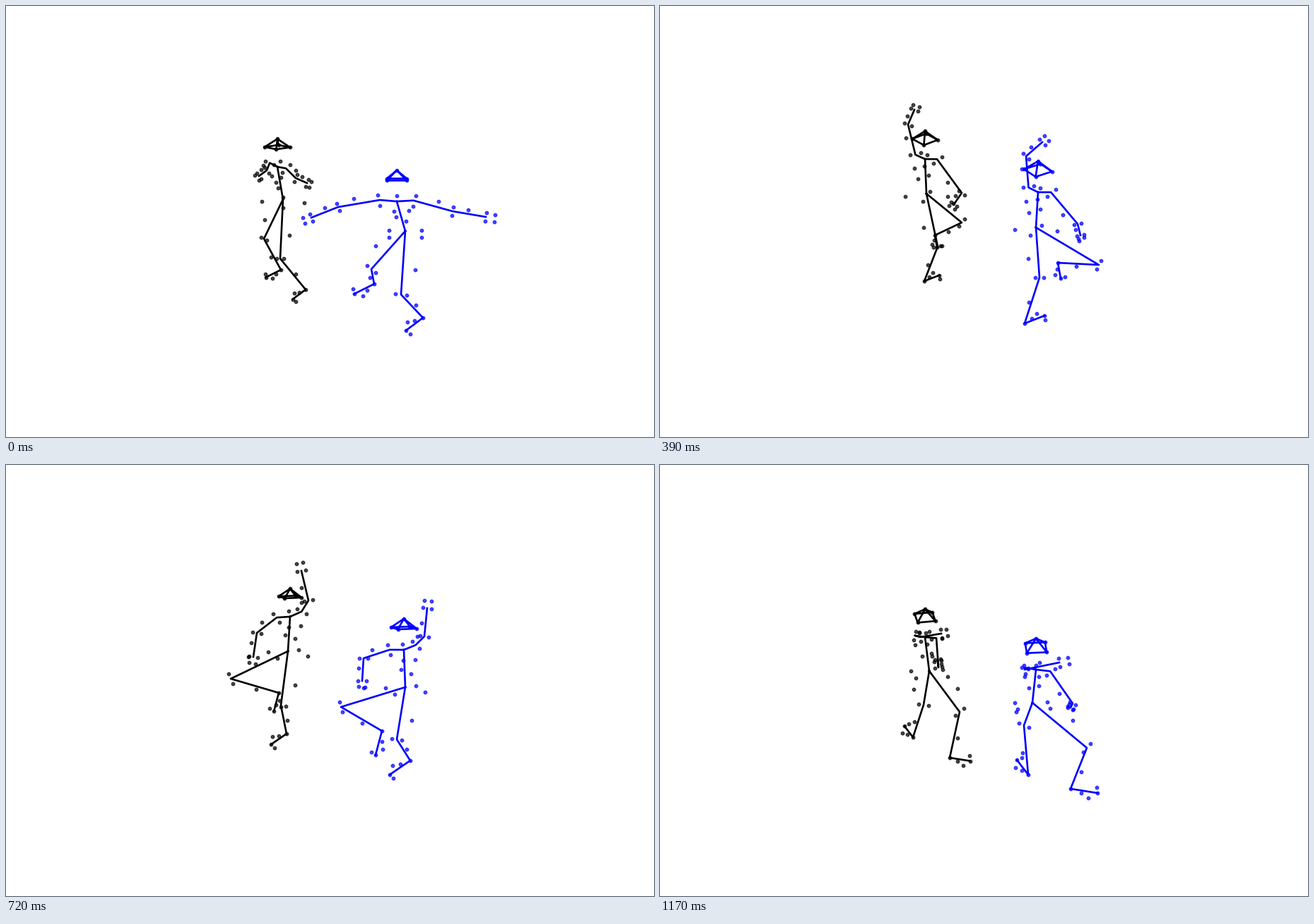
These frames come from a looping animation (917 px wide and 611 px high, 1200 ms). A matplotlib script:

```python
import numpy as np
import matplotlib.pyplot as plt
from matplotlib.animation import FuncAnimation

W, H, DPI = 917, 611, 100
FRAMES, STEP = 40, 30
KEYS = np.array([0, 9, 13, 20, 24, 30, 39])

# Per key pose: wrist A, elbow A, neck, elbow B, wrist B,
# pelvis, knee B, ankle B, knee A, ankle A.
BLACK = [
    [426, 251, 410, 244, 384, 228, 369, 233, 358, 241,
     392, 274, 365, 330, 389, 374, 388, 358, 424, 402],
    [328, 160, 319, 194, 384, 228, 451, 236, 440, 256,
     379, 281, 421, 291, 406, 329, 379, 350, 392, 403],
    [360, 147, 351, 168, 375, 217, 427, 265, 416, 281,
     377, 266, 427, 307, 389, 325, 393, 341, 374, 390],
    [390, 149, 422, 179, 393, 216, 349, 258, 356, 286,
     400, 260, 367, 320, 398, 319, 398, 344, 382, 382],
    [418, 150, 428, 192, 402, 215, 355, 238, 350, 272,
     399, 264, 318, 303, 386, 323, 389, 341, 397, 381],
    [370, 259, 395, 233, 388, 223, 399, 237, 419, 241,
     388, 277, 366, 277, 376, 325, 372, 345, 398, 387],
    [398, 239, 368, 244, 375, 244, 394, 287, 393, 278,
     381, 292, 424, 350, 410, 415, 373, 340, 358, 386],
]
BLUE = [
    [679, 299, 632, 291, 553, 277, 470, 285, 432, 300,
     565, 319, 517, 373, 521, 394, 559, 409, 590, 442],
    [503, 203, 486, 243, 543, 272, 614, 275, 602, 293,
     544, 324, 597, 328, 554, 369, 542, 392, 570, 459],
    [541, 193, 518, 213, 535, 264, 591, 309, 595, 325,
     532, 314, 621, 367, 563, 364, 537, 385, 516, 450],
    [569, 189, 592, 226, 556, 258, 495, 299, 512, 328,
     561, 306, 499, 381, 555, 375, 560, 384, 542, 410],
    [596, 203, 592, 243, 563, 262, 506, 274, 504, 306,
     565, 315, 474, 343, 532, 377, 553, 389, 572, 419],
    [529, 298, 551, 274, 551, 272, 571, 315, 598, 334,
     549, 323, 524, 321, 547, 373, 526, 390, 561, 447],
    [565, 280, 516, 290, 532, 290, 584, 338, 581, 344,
     527, 337, 604, 401, 581, 459, 515, 369, 521, 439],
]
BLACK_TURN = [-50, 155, 220, 345, 380, 455, 550]
BLUE_TURN = [0, 155, 215, 345, 380, 455, 545]
# Feet of both dancers, ankle to toe: leg B, leg A.
FEET = [[-28, 14, -24, 18], [-6, 27, -26, -15], [4, 22, 28, -11], [4, 33, 8, 28],
        [-9, 34, -29, 20], [13, 17, -35, -16], [38, 6, -16, -21]]

NECK, PELVIS = 8, 13
ARMS = [((7, 6, 5), 1), ((9, 10, 11), -1)]
LEGS = [((13, 17, 18, 19), 1), ((13, 14, 15, 16), -1)]
PATHS = [(1, 2, 3, 4, 1), (1, 0, 3), (2, 0, 4), range(5, 12),
         (8, 12, 13), (13, 14, 15, 16), (13, 17, 18, 19)]
ON_JOINT = [0, 1, 2, 3, 4, 15, 16, 18, 19]

# Limb markers: bone number, place along it, sideways shift in pixels.
ARM_PAIRS = [(0, .03, 8), (1, 0, 6), (1, 1, 6), (1, 1.27, 5)]
ARM_DOTS = [(0, .6, -8), (1, .45, -6)]
ARM_DOTS += [(b, t, s * k) for b, t, s in ARM_PAIRS for k in (-1, 1)]
LEG_DOTS = [(0, .6, -18), (0, 1, -8), (0, 1, 8), (1, .55, -5),
            (2, .4, 4), (2, .95, -8), (2, .7, 9)]
# Torso markers: place from neck to pelvis, radius, angle, drop.
TORSO_DOTS = [(0, 5, 90, -7), (.05, 9, 240, 10), (.5, 7, 200, 0),
              (.6, 12, 300, 0), (.25, 16, 330, 0)]
TORSO_DOTS += [(1, 30, side + k, 4) for side in (0, 180) for k in (-40, 40)]


def slopes(y):
    """Monotone tangents, so that turning points stay at the keys."""
    h = np.diff(KEYS).reshape(-1, *[1] * (y.ndim - 1))
    d = np.diff(y, axis=0) / h
    a, b = d[:-1], d[1:]
    same = a * b > 0
    mean = np.where(same, 2 * a * b / np.where(same, a + b, 1), 0)
    return np.concatenate([d[:1], mean, d[-1:]])


class Track:
    """Smooth curve through the values at the key times."""

    def __init__(self, values, shape=()):
        self.y = np.array(values, float).reshape(len(KEYS), *shape)
        self.m = slopes(self.y)

    def at(self, f):
        y, m = self.y, self.m
        i = min(np.searchsorted(KEYS, f, side="right") - 1, len(KEYS) - 2)
        h = KEYS[i + 1] - KEYS[i]
        u = (f - KEYS[i]) / h
        v = 1 - u
        return ((1 + 2 * u) * v * v * y[i] + u * v * v * h * m[i]
                + u * u * (3 - 2 * u) * y[i + 1] - u * u * v * h * m[i + 1])


def around(radius, angle, tilt):
    """Point on a level circle seen slightly from above."""
    w = np.radians(angle)
    return radius * np.array([np.cos(w), -tilt * np.sin(w)])


def limb_dots(p, chain, dots, side):
    out = []
    for bone, t, shift in dots:
        a, b = p[chain[bone]], p[chain[bone + 1]]
        d = b - a
        normal = np.array([-d[1], d[0]]) / (np.hypot(*d) + 2)
        out.append(a + t * d + side * shift * normal)
    return out


def torso_dots(p, turn):
    return [p[NECK] + t * (p[PELVIS] - p[NECK]) + around(r, angle + turn, .25) + (0, drop)
            for t, r, angle, drop in TORSO_DOTS]


class Dancer:
    def __init__(self, ax, poses, turn, color, size, foot):
        self.joints = Track(poses, (10, 2))
        self.turn = Track(turn)
        self.feet = Track(FEET, (2, 2))
        self.size, self.foot = size, foot
        self.dots, = ax.plot([], [], "o", color=color, ms=3.2, mew=1, alpha=.7)
        self.lines, = ax.plot([], [], color=color, lw=1.9,
                              solid_joinstyle="round")

    def pose(self, f, turn):
        q = self.joints.at(f)
        if f > KEYS[-2]:
            # The arms open during the last half turn.
            swing = np.sin(np.pi * (f - KEYS[-2]) / (KEYS[-1] - KEYS[-2])) ** 2
            q[[0, 1, 3, 4], 0] += swing * np.array([-55, -30, 10, 28])
        wrist_a, elbow_a, neck, elbow_b, wrist_b, pelvis = q[:6]
        knee_b, ankle_b, knee_a, ankle_a = q[6:]

        s = self.size
        tilt = .3 - .2 * np.cos(np.radians(turn))
        crown = neck + (0, -44 * s)
        ring = [neck + (0, -31 * s) + around(20 * s, turn + a, tilt)
                for a in (225, 315, 45, 135)]
        shoulder_a, shoulder_b = (
            neck + (0, -3) + around(14, turn + a, .3) + .12 * (elbow - neck)
            for a, elbow in ((0, elbow_a), (180, elbow_b)))
        toe_b, toe_a = np.array([ankle_b, ankle_a]) + self.foot * self.feet.at(f)
        return np.array([
            crown, *ring, wrist_a, elbow_a, shoulder_a, neck,
            shoulder_b, elbow_b, wrist_b, (neck + pelvis) / 2, pelvis,
            knee_b, ankle_b, toe_b, knee_a, ankle_a, toe_a])

    def draw(self, f):
        turn = self.turn.at(f)
        p = self.pose(f, turn)
        gap = np.full((1, 2), np.nan)
        path = np.concatenate([q for s in PATHS for q in (p[list(s)], gap)])
        self.lines.set_data(path[:, 0], path[:, 1])

        dots = list(p[ON_JOINT]) + torso_dots(p, turn)
        for chain, side in ARMS:
            dots += limb_dots(p, chain, ARM_DOTS, side)
        for chain, side in LEGS:
            dots += limb_dots(p, chain, LEG_DOTS, side * np.cos(np.radians(turn)))
        dots = np.array(dots)
        self.dots.set_data(dots[:, 0], dots[:, 1])
        return self.dots, self.lines


fig = plt.figure(figsize=(W / DPI, H / DPI), dpi=DPI, facecolor="white")
ax = fig.add_axes([0, 0, 1, 1])
ax.set_xlim(0, W)
ax.set_ylim(H, 0)
ax.axis("off")

dancers = [Dancer(ax, BLACK, BLACK_TURN, "black", .9, .75),
           Dancer(ax, BLUE, BLUE_TURN, "blue", 1, 1)]


def update(f):
    return [artist for d in dancers for artist in d.draw(f)]


anim = FuncAnimation(fig, update, frames=FRAMES, interval=STEP,
                     repeat=True, repeat_delay=0, blit=False)
plt.show()
```
